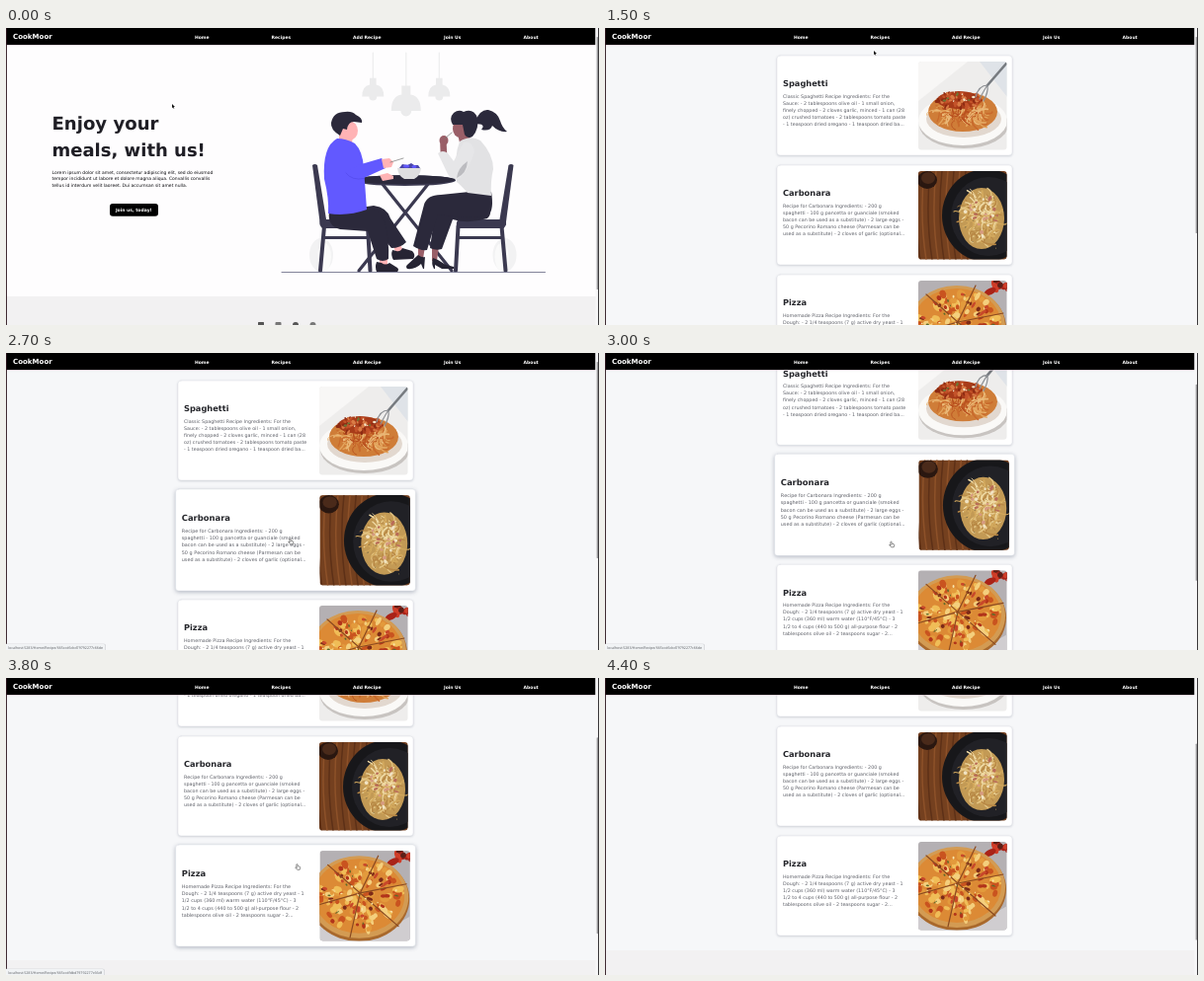
These frames come from a looping animation (600 px wide and 301 px high, 4500 ms). An HTML page with a canvas:

```html
<!DOCTYPE html>
<html lang="en">
<head>
<meta charset="utf-8">
<title>CookMoor</title>
<style>
html, body { margin: 0; width: 100%; height: 100%; overflow: hidden; background: #fff; }
canvas { display: block; width: 600px; height: 301px; }
</style>
</head>
<body>
<canvas id="stage"></canvas>
<script>
const W = 600, H = 301, LOOP = 4500, STEP = 100;
const canvas = document.getElementById('stage');
const dpr = window.devicePixelRatio || 1;
canvas.width = W * dpr;
canvas.height = H * dpr;
const c = canvas.getContext('2d');
const INK = '#2b293b', SHOE = '#262433', WOOD = '#3b3950', PURPLE = '#6259ff', PINK = '#ffb3b5', BROWN = '#9a5f68', PALE = '#ebebec';
const SANS = '"DejaVu Sans", Verdana, sans-serif';

// ---------- helpers ----------
function fill(d, color) {
  c.fillStyle = color;
  c.fill(new Path2D(d));
}
function line(d, color, w) {
  c.strokeStyle = color;
  c.lineWidth = w;
  c.lineCap = c.lineJoin = 'round';
  c.stroke(new Path2D(d));
}
function rect(x, y, w, h, color) {
  c.fillStyle = color;
  c.fillRect(x, y, w, h);
}
function round(x, y, w, h, r, color) {
  c.fillStyle = color;
  c.beginPath();
  c.roundRect(x, y, w, h, r);
  c.fill();
}
function oval(x, y, rx, ry, color, rot = 0) {
  c.fillStyle = color;
  c.beginPath();
  c.ellipse(x, y, rx, ry, rot, 0, 7);
  c.fill();
}
function text(s, x, y, size, color, bold, align = 'left', family = SANS) {
  c.font = `${bold ? 'bold ' : ''}${size}px ${family}`;
  c.fillStyle = color;
  c.textAlign = align;
  c.fillText(s, x, y);
}
function random(seed) {
  return () => (seed = (seed * 16807) % 2147483647) / 2147483647;
}
const clamp = v => Math.max(0, Math.min(1, v));
const ease = v => .5 - .5 * Math.cos(Math.PI * clamp(v));
const within = (t, [a, b]) => t >= a && t < b;

// ---------- timeline ----------
const path = [ // time, x, y
  [0, 168, 77], [100, 178, 72], [300, 330, 34], [500, 448, 9], [650, 452, 9],
  [850, 366, 10], [1050, 278, 11], [1100, 277, 13], [1250, 276, 14], [1500, 272, 23],
  [1600, 272, 23], [1800, 270, 62], [2000, 270, 79], [2300, 274, 88], [2550, 285, 165],
  [2700, 287, 188], [3000, 289, 191], [3800, 294, 188.5], [4050, 294, 187], [4300, 300, -10], [4500, 300, -10]
];
function pointer(t) {
  const i = Math.max(1, path.findIndex(p => p[0] > t));
  const a = path[i - 1], b = path[i], k = ease((t - a[0]) / (b[0] - a[0]));
  return [a[1] + (b[1] - a[1]) * k, a[2] + (b[2] - a[2]) * k];
}
const notch = (t, start, dur, dist) => dist * ease((t - start) / dur);
const scrollAt = t => notch(t, 2700, 350, 37.5) + notch(t, 3150, 350, 37.5) + notch(t, 3690, 280, 15);

const OPEN = 1200;
const menu = [
  { label: 'Home', x: 198.3 },
  { label: 'Recipes', x: 278.3, on: [1000, 1300], link: 'Recipes' },
  { label: 'Add Recipe', x: 365.2, on: [800, 900], link: 'AddRecipe' },
  { label: 'Join Us', x: 451.7, on: [500, 700], link: 'JoinUs' },
  { label: 'About', x: 531.2 }
];
const cards = [
  { title: 'Spaghetti', on: [1700, 2400], keep: [1700, 2500], link: 'Recipe/665ccc4bd79792277c66dd', photo: spaghetti, lines: [
    'Classic Spaghetti Recipe Ingredients: For the',
    'Sauce: - 2 tablespoons olive oil - 1 small onion,',
    'finely chopped - 2 cloves garlic, minced - 1 can (28',
    'oz) crushed tomatoes - 2 tablespoons tomato paste',
    '- 1 teaspoon dried oregano - 1 teaspoon dried ba...'] },
  { title: 'Carbonara', on: [2500, 3300], keep: [2500, 3400], link: 'Recipe/665ccd6cbd79792277c66de', photo: carbonara, lines: [
    'Recipe for Carbonara Ingredients: - 200 g',
    'spaghetti - 100 g pancetta or guanciale (smoked',
    'bacon can be used as a substitute) - 2 large eggs -',
    '50 g Pecorino Romano cheese (Parmesan can be',
    'used as a substitute) - 2 cloves of garlic (optional...'] },
  { title: 'Pizza', on: [3400, 4120], keep: [3400, 4300], link: 'Recipe/665ccdfdbd79792277c66df', photo: pizza, lines: [
    'Homemade Pizza Recipe Ingredients: For the',
    'Dough: - 2 1/4 teaspoons (7 g) active dry yeast - 1',
    '1/2 cups (360 ml) warm water (110°F/45°C) - 3',
    '1/2 to 4 cups (440 to 500 g) all-purpose flour - 2',
    'tablespoons olive oil - 2 teaspoons sugar - 2...'] }
];

// ---------- home page ----------
function lamp(x, y, r) { // y is the rim of the shade
  line(`M${x} 25V${y - r}`, PALE, 1.1);
  oval(x, y, r * .36, r * .36, PALE);
  fill(`M${x - r} ${y}Q${x - r} ${y - r} ${x - r * .3} ${y - r * 1.1}V${y - r * 1.7}H${x + r * .3}V${y - r * 1.1}Q${x + r} ${y - r} ${x + r} ${y}z`, PALE);
}
function chair(flip) {
  c.save();
  if (flip) {
    c.translate(823.5, 0);
    c.scale(-1, 1);
  }
  oval(319, 230, 12, 17, '#f2f2f3');
  oval(322, 232, 7, 14, '#fafafa');
  fill('M310 139q2.500-2 5 0L325 200H318z', WOOD);
  fill('M318 194H366q3 4 1 9H320q-4-4-2-9z', WOOD);
  line('M322 201L318 246M366 201L368.500 246', WOOD, 4);
  line('M321 212.500H366', WOOD, 3);
  c.restore();
}
function man() {
  // ankles, shoes and legs
  fill('M378 233h8v8h-8zM391 219l7-2 4 9-7 3z', PINK);
  fill('M375 237l5 1q4 3 8 0l8 5q2 2 0 4H375q-2-5 0-10z', SHOE);
  fill('M391 225l4 1q4 1 6-3l10 3q4 4 1 8l-20 1q-3-5-1-10z', SHOE);
  fill('M338 185L372 180Q386 182 389 193L405 217Q399 223 390 223L370 199z', INK);
  fill('M327 186L362 181Q380 184 383 196Q388 215 387 234Q381 238 375 234L366 206L338 204Q325 201 327 186z', INK);
  // head
  fill('M337 102L351 106 350 119 337 117z', PINK);
  oval(348, 104, 8, 9.500, PINK);
  fill('M338 109Q328 103 329 96Q331 85 343 85Q350 84 354 88Q361 91 360 96L352 95Q346 95 345 103L341 102z', INK);
  // body
  fill('M335 112Q344 112 353 117Q361 125 362 142L365 184Q346 191 326 188Q327 173 322 153Q320 120 335 112z', PURPLE);
  fill('M356 139L380 132Q384 136 384 142L362 152Q348 154 343 146z', PURPLE);
  line('M362 152.500Q350 155 344 147', '#4d45e0', .5);
  fill('M380 133l8-1 4 4-2 5-8 1z', PINK);
  fill('M378 149l8-2 6 3 0 3-11 2z', PINK);
  line('M389 136L402 132', '#777', .7);
}
function woman() {
  // ankles, boots and legs
  fill('M417 221h7l-2 13h-5zM431 221h7l-2 15h-5z', BROWN);
  fill('M417 230q4 3 7 2l-1 12h-1l-2-5q-6 6-14 5q-2-2 0-4z', SHOE);
  fill('M432 233l5 2 8 5 8 2q1 1 0 2H441l-7-4v4h-1q-3-5-1-11z', SHOE);
  fill('M482 168Q495 187 487 193Q468 199 452 194L441 224Q435 226 429 223L434 187z', INK);
  fill('M469 166H491Q494 184 488 190Q466 194 437 189L426 225Q419 226 412 221L423 179Q426 169 440 169z', INK);
  // hair and head
  fill('M475 94Q480 82 488 83Q497 85 500 94Q502 101 507 105Q499 106 492 99Q490 105 481 103Q486 97 475 97z', INK);
  fill('M456 104L469 105 470 118 459 116z', BROWN);
  oval(459, 102, 7, 9, BROWN);
  fill('M452 98Q448 91 453 86Q458 82 463 85Q473 81 477 91Q479 102 472 110Q467 113 464 108L462 98z', INK);
  // body
  fill('M459 115Q470 108 480 114Q493 128 493 143Q490 155 491 170L467 167Q459 158 456 156Q453 130 459 115z', '#e2e2e4');
  line('M442.500 118L443 130', BROWN, 6.500);
  oval(443, 114, 4.500, 5, BROWN);
  fill('M437 127Q442 123 447 127L453 135L463 116Q473 114 474 126Q467 147 458 153Q451 155 447 148z', '#e6e6e8');
  fill('M467 135Q466 148 456 152Q457 142 467 135z', '#bcbcc0');
  line('M444 112L451 106', '#777', .7);
}
function diners() {
  lamp(371.3, 69.500, 11);
  lamp(404.800, 84, 15);
  lamp(438.300, 69.500, 11);
  chair(false);
  chair(true);
  line('M380 157L451 246M428 157L357 246', WOOD, 3.2);
  woman();
  oval(403.500, 154.500, 51.500, 5.500, WOOD);
  oval(403.500, 153.700, 51, 4.500, INK);
  man();
  fill('M396 142H420Q419 150 413 153H403Q397 150 396 142z', '#dededf');
  fill('M398 142l3-4 5 1 4-2 3 2 4 0 2 3z', '#4a45a8');
  oval(405, 140, 3, 1.500, PURPLE);
  oval(413, 140.500, 2.500, 1.500, PURPLE);
  line('M279 247.500H545.500', '#74758f', .9);
}
function home() {
  rect(0, 0, W, H, '#fefdfe');
  text('Enjoy your', 46.5, 102.9, 18.1, '#1f1e25', true);
  text('meals, with us!', 46.5, 130, 18, '#1f1e25', true);
  ['Lorem ipsum dolor sit amet, consectetur adipiscing elit, sed do eiusmod',
   'tempor incididunt ut labore et dolore magna aliqua. Convallis convallis',
   'tellus id interdum velit laoreet. Dui accumsan sit amet nulla.'
  ].forEach((s, i) => text(s, 46.5, 147.5 + i * 6.75, 4.5, '#0c0c10'));
  round(105, 178, 49, 12.700, 3, '#000');
  text('Join us, today!', 129.3, 186, 4.5, '#fff', true, 'center');
  diners();
  footer(272);
  round(255, 298, 6, 6, .5, '#555');
  round(272.500, 298, 6, 6, 1, '#777');
  oval(293, 301, 3, 3, '#555');
  oval(310.500, 301, 3, 3, '#777');
}
function footer(y) {
  rect(0, y, W, 60, '#f2f1f2');
}

// ---------- recipe photos, each 90 by 90 ----------
function strands(n, x, y, rx, ry, colors, seed) {
  const r = random(seed);
  for (let i = 0; i < n; i++) {
    const a = r() * 6.28, d = Math.sqrt(r());
    c.strokeStyle = colors[i % colors.length];
    c.lineWidth = .8 + r();
    c.beginPath();
    c.ellipse(x + Math.cos(a) * d * rx, y + Math.sin(a) * d * ry, 4 + r() * 7, 2 + r() * 4, r() * 3, a, a + 2.4);
    c.stroke();
  }
}
function dots(n, x, y, rx, ry, colors, size, seed) {
  const r = random(seed);
  for (let i = 0; i < n; i++) {
    const a = r() * 6.28, d = Math.sqrt(r());
    oval(x + Math.cos(a) * d * rx, y + Math.sin(a) * d * ry, size * (.5 + r()), size * (.4 + r() * .6), colors[i % colors.length], a);
  }
}
function spaghetti() {
  rect(0, 0, 90, 90, '#eeedec');
  fill('M0 0H50L0 40z', '#f8f7f6');
  fill('M62 0H90V36z', '#dfe3e8');
  oval(46, 64, 45, 24, '#c8c4c1');
  oval(45, 60, 45, 25, '#faf9f7');
  oval(46, 58, 38, 19, '#e2d8cf');
  oval(45, 51, 35, 20, '#cf7d38');
  strands(90, 45, 52, 29, 14, ['#e3a45c', '#c96a2c', '#eab877', '#b9501f'], 17);
  oval(41, 39, 22, 9, '#a83b19');
  dots(45, 41, 39, 23, 9, ['#8c2a12', '#c4532a', '#d97b45'], 2.2, 29);
  dots(12, 40, 36, 17, 6, ['#f4e3c4', '#6b7a35'], 1.2, 37);
  line('M89 2L70 24', '#777b80', 2.6);
  line('M70 24Q61 24 58 36M70 24Q67 28 62 38M70 24Q71 31 66 40', '#8c8f93', 1.2);
}
function carbonara() {
  rect(0, 0, 90, 90, '#74401f');
  for (let i = 0; i < 9; i++) line(`M${i * 6} 0Q${i * 6 - 5} 45 ${i * 6 + 2} 90`, i % 2 ? '#8d5129' : '#5d3017', 1.5);
  oval(9, 9, 10, 9, '#2a1710');
  oval(10, 7, 7, 6, '#4a2a1a');
  oval(69, 45, 45, 47, '#17171a');
  oval(71, 46, 38, 40, '#212126');
  oval(64, 48, 23, 31, '#c39a55');
  strands(110, 64, 47, 19, 28, ['#e4c583', '#d3a95d', '#b88845', '#f0dba6'], 41);
  dots(24, 63, 45, 17, 22, ['#b96c58', '#d69a80', '#f1e3c2'], 2, 53);
  dots(18, 70, 50, 24, 35, ['#d8c391', '#857249'], .7, 61);
}
function pizza() {
  rect(0, 0, 90, 90, '#b4b0b3');
  fill('M0 70Q40 95 90 65V90H0z', '#d0cdd0');
  dots(10, 79, 9, 13, 9, ['#a92318', '#cf3c27', '#5c2018'], 4.5, 7);
  oval(39, 48, 50, 42, '#a9692d');
  oval(39, 46, 49, 41, '#d39b53');
  oval(39, 45, 45, 37, '#dc8a35');
  dots(120, 39, 45, 42, 34, ['#f0bd57', '#e39a3c', '#c9531f', '#f4cf7d'], 3.6, 19);
  dots(36, 39, 45, 41, 33, ['#b2341a', '#7d2a17', '#c8482a'], 2.3, 71);
  line('M40 42L8 14M40 42L58 5M40 42L86 33M40 42L78 75M40 42L30 86M40 42L-6 55', '#8b4a20', 1.2);
  dots(22, 39, 45, 40, 32, ['#5d6b2a', '#f8e3a8'], 1.1, 83);
}

// ---------- recipes page ----------
function drawCard(card, i, t) {
  const [on, off] = card.on;
  const hover = ease((t - on + 100) / 200) * (1 - ease((t - off + 100) / 200));
  const top = 28 + i * 111, size = 1 + .02 * hover;
  c.save();
  c.translate(293, top + 50.5);
  c.scale(size, size);
  c.translate(-119, -50.5);
  c.save();
  c.shadowColor = `rgba(30,40,70,${.22 + .12 * hover})`;
  c.shadowBlur = (2.5 + 2 * hover) * dpr;
  c.shadowOffsetY = (.7 + .5 * hover) * dpr;
  round(0, 0, 238, 101, 3, '#fff');
  c.restore();
  c.strokeStyle = '#dcdfe5';
  c.lineWidth = .5;
  c.beginPath();
  c.roundRect(0, 0, 238, 101, 3);
  c.stroke();
  text(card.title, 6, 31.4, 8.25, '#25262b', true);
  card.lines.forEach((s, n) => text(s, 6, 42.8 + n * 7.15, 4.8, '#5f6169'));
  c.beginPath();
  c.roundRect(143, 6, 89.5, 89.5, 3);
  c.clip();
  c.translate(143, 6);
  card.photo();
  c.restore();
}
function recipes(t) {
  rect(0, 0, W, H, '#f6f7f9');
  c.save();
  c.translate(0, -scrollAt(t));
  footer(366);
  cards.forEach((card, i) => drawCard(card, i, t));
  c.restore();
}

// ---------- browser parts ----------
function nav(t) {
  rect(0, 17, 596.500, .6, '#d9c6d1');
  rect(0, 0, 596.500, 17, '#000');
  text('CookMoor', 7, 11.4, 7.05, '#fff', true);
  for (const m of menu) {
    const hot = m.on && within(t, m.on);
    if (hot) {
      c.font = `bold 4.5px ${SANS}`;
      const w = c.measureText(m.label).width + 11;
      round(m.x - w / 2, 3, w, 11.5, 2, '#383842');
    }
    text(m.label, m.x, 10.5, 4.5, hot ? '#c3c3ca' : '#fff', true, 'center');
  }
}
function scrollbar(t) {
  const open = t >= OPEN;
  rect(596.500, 0, 2.500, H, '#f7f7f8');
  const y = open ? 9 + scrollAt(t) * .64 : 9;
  round(597.700, y, 1.200, open ? 199 : 256, .6, '#929295');
  rect(599, 0, 1, H, '#3a383b');
  rect(0, 0, .9, H, '#2c151d');
}
function status(t) {
  const hit = menu.find(m => m.on && within(t, m.on)) || cards.find(k => within(t, k.keep));
  if (!hit) return;
  const url = 'localhost:5283/Home/' + hit.link, font = '"Open Sans", "Noto Sans", sans-serif';
  c.font = `3.6px ${font}`;
  const w = c.measureText(url).width + 4.5;
  round(0, 294.700, w + .4, 7, [0, 1.5, 0, 0], '#c4c6ca');
  round(0, 295.100, w, 7, [0, 1.5, 0, 0], '#f1f3f5');
  text(url, 2.2, 299.9, 3.6, '#55585d', false, 'left', font);
}
function cursor(t) {
  const [x, y] = pointer(t);
  const hand = menu.some(m => m.on && within(t, m.on)) || cards.some(k => within(t, k.on));
  c.save();
  c.translate(x, y);
  if (hand) {
    const d = 'M0 .4Q.6-.3 1.100.4V2.200L3.300 2.700Q3.900 3 3.700 4L3.200 5.800H.6L-1.300 3.600Q-1.200 2.900-.4 3.300L0 3.700z';
    fill(d, '#fff');
    line(d, '#222', .5);
  } else {
    const d = 'M0 0V4.200L1 3.300 1.700 4.800 2.300 4.500 1.700 3H3z';
    line(d, '#fff', .6);
    fill(d, '#111');
  }
  c.restore();
}

function draw(t) {
  c.setTransform(dpr, 0, 0, dpr, 0, 0);
  c.textRendering = 'geometricPrecision';
  c.fontKerning = 'none';
  if (t < OPEN) home();
  else recipes(t);
  nav(t);
  scrollbar(t);
  status(t);
  cursor(t);
}

const start = performance.now();
let last = -1;
function tick(now) {
  const t = Math.floor((Math.max(0, now - start) % LOOP) / STEP) * STEP;
  if (t !== last) draw(last = t);
  requestAnimationFrame(tick);
}
draw(0);
requestAnimationFrame(tick);
</script>
</body>
</html>
```
